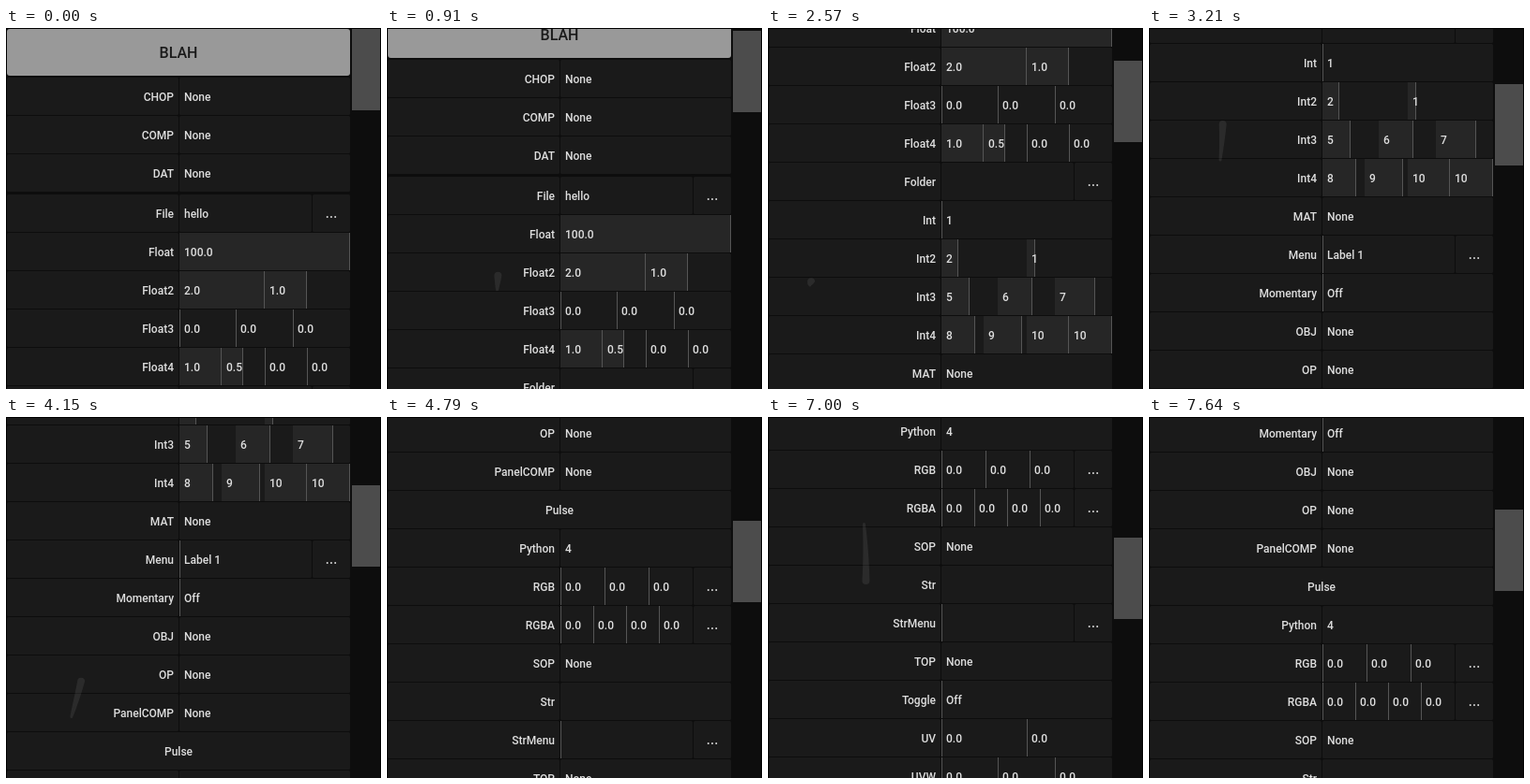
An HTML page for the animation above (8 s loop, 400 by 386 pixels).

```html
<!DOCTYPE html>
<html lang="en">
<head>
<meta charset="utf-8">
<title>Scrolling parameter list</title>
<style>
  html, body { margin: 0; width: 100%; height: 100%; overflow: hidden; background: #0d0d0d; }
  svg { display: block; width: 400px; height: 386px; }
  text { font: 500 12px Roboto, "Noto Sans", sans-serif; fill: #dedede; }
  .title { font-size: 16px; fill: #1a1a1a; }
  .end { text-anchor: end; }
  .mid { text-anchor: middle; }
  .dots { font-weight: 700; letter-spacing: .7px; }
</style>
</head>
<body>
<svg viewBox="0 0 400 386">
  <defs><clipPath id="view"><rect x="1" y="1" width="398" height="385"/></clipPath></defs>
  <rect width="400" height="386" fill="#000"/>
  <rect x="1" y="1" width="398" height="385" fill="#0d0d0d"/>
  <g clip-path="url(#view)">
    <g id="list"></g>
    <path id="trail" fill="#fff" fill-opacity=".075"/>
  </g>
  <rect id="thumb" x="369" y="1" width="30" height="87" fill="#4c4c4c"/>
</svg>
<script>
const LOOP = 8000, STEP = 80;
const list = document.getElementById('list');
const trail = document.getElementById('trail');
const thumb = document.getElementById('thumb');

function add(tag, attrs, text) {
  const el = document.createElementNS('http://www.w3.org/2000/svg', tag);
  for (const key in attrs) el.setAttribute(key, attrs[key]);
  if (text) el.textContent = text;
  list.appendChild(el);
}
const box = (x, y, width, height, fill, rx = 0) => add('rect', { x, y, width, height, fill, rx });
const label = (x, y, text, cls = '') => add('text', { x, y, class: cls }, text);

// Each cell is [text, fill fraction]; a missing fraction means no slider bar.
const zeros = n => Array.from({ length: n }, () => ['0.0', 0]);
const tenths = (...values) => values.map(v => [String(v), v / 10]);
const none = [['None']];
const rows = [
  ['CHOP', none], ['COMP', none], ['DAT', none],
  ['File', [['hello']], true],
  ['Float', [['100.0', 1]]],
  ['Float2', [['2.0', 1], ['1.0', .5]]],
  ['Float3', zeros(3)],
  ['Float4', [['1.0', 1], ['0.5', .5], ...zeros(2)]],
  ['Folder', [['']], true],
  ['Int', [['1', 0]]],
  ['Int2', tenths(2, 1)],
  ['Int3', tenths(5, 6, 7)],
  ['Int4', tenths(8, 9, 10, 10)],
  ['MAT', none],
  ['Menu', [['Label 1', 0]], true],
  ['Momentary', [['Off', 0]]],
  ['OBJ', none], ['OP', none], ['PanelCOMP', none],
  ['Pulse', null],
  ['Python', [['4']]],
  ['RGB', zeros(3), true],
  ['RGBA', zeros(4), true],
  ['SOP', none],
  ['Str', [['']]],
  ['StrMenu', [['', 0]], true],
  ['TOP', none],
  ['Toggle', [['Off', 0]]],
  ['UV', zeros(2)], ['UVW', zeros(3)], ['WH', zeros(2)],
  ['XY', zeros(2)], ['XYZ', zeros(3)]
];

function drawRow([name, cells, button], y) {
  const base = y + 25, back = '#1a1a1a';
  if (!cells) {
    box(1, y, 366, 40, back, 1.5);
    label(184, base, name, 'mid');
    return;
  }
  const room = button ? 141 : 182;
  box(1, y, 183, 40, back, 1.5);
  label(179, base, name, 'end');
  box(185, y, room, 40, back, 1.5);
  if (button) {
    box(327, y, 40, 40, back, 1.5);
    label(347.4, base, '...', 'mid dots');
  }
  const width = room / cells.length;
  cells.forEach(([text, part], i) => {
    const x = 185 + i * width, left = Math.floor(x);
    if (part !== undefined) {
      const edge = Math.floor(x + part * width - (part ? .6 : 0));
      if (part) box(left, y, edge - left, 40, '#262626');
      box(edge, y, 1, 40, '#555');
    }
    if (text) label(left + 5, base, text);
  });
}

box(1, 1, 366, 50, '#999', 3);
label(184, 32, 'BLAH', 'title mid');
rows.forEach((row, i) => drawRow(row, 53 + 41 * i + (i > 2 ? 2 : 0)));

// A swipe eases the scroll between two values and passes through (n, s) with
// the pointer at height y; the pointer follows the arc x = px - k (y - py)^2.
const swipes = [
  { start: 750, steps: 16, from: 0, to: 235, n: 10, s: 157, y: 127, held: 11, px: 122, py: 130, k: .0002 },
  { start: 2570, steps: 13, from: 235, to: 457, n: 9, s: 407, y: 103, held: 11, px: 79, py: 85, k: .00095 },
  { start: 4070, steps: 10, from: 457, to: 755, n: 5, s: 620, y: 160, held: 8, px: 100, py: 120, k: .00075 },
  { start: 5330, steps: 11, from: 755, to: 1022, n: 7, s: 986, y: 79, held: 9, px: 53, py: 108, k: .0006 },
  { start: 6680, steps: 13, from: 1022, to: 673, n: 5, s: 880, y: 175, held: 10, px: 104.5, py: 165, k: .0008 }
];
const smooth = v => v * v * (3 - 2 * v);
const unsmooth = y => .5 - Math.sin(Math.asin(1 - 2 * y) / 3);
for (const w of swipes) {
  w.power = Math.log(unsmooth((w.s - w.from) / (w.to - w.from))) / Math.log(w.n / w.steps);
}

function scrollAt(w, n) {
  const u = Math.min(1, Math.max(0, n / w.steps));
  return w.from + (w.to - w.from) * smooth(Math.pow(u, w.power));
}

function pointerAt(w, n) {
  const y = w.y + w.s - scrollAt(w, n);
  return { x: w.px - w.k * (y - w.py) ** 2, y };
}

// Tapered stroke with a round head, covering the last moments of the swipe.
function trailPath(w, n) {
  const tail = Math.max(0, n - 1.6), parts = 8;
  const left = [], right = [];
  for (let i = 0; i <= parts; i++) {
    const p = pointerAt(w, tail + (n - tail) * i / parts);
    const r = 1.5 + 2.5 * i / parts;
    left.push(`${(p.x - r).toFixed(2)} ${p.y.toFixed(2)}`);
    right.unshift(`${(p.x + r).toFixed(2)} ${p.y.toFixed(2)}`);
  }
  const turn = w.to > w.from ? 1 : 0;
  return `M${left.join('L')}A4 4 0 0 ${turn} ${right.join('L')}A1.5 1.5 0 0 ${turn} ${left[0]}Z`;
}

function draw(time) {
  const t = time % LOOP;
  let scroll = 0, path = '';
  for (const w of swipes) {
    if (t < w.start) break;
    const n = Math.floor((t - w.start) / STEP) + 1;
    scroll = Math.round(scrollAt(w, n));
    path = n <= w.held ? trailPath(w, n) : '';
  }
  list.setAttribute('transform', `translate(0 ${-scroll})`);
  thumb.setAttribute('y', Math.round(.6 + .1457 * scroll));
  trail.setAttribute('d', path);
}

const origin = performance.now();
function tick() {
  draw(performance.now() - origin);
  requestAnimationFrame(tick);
}
tick();
</script>
</body>
</html>
```
